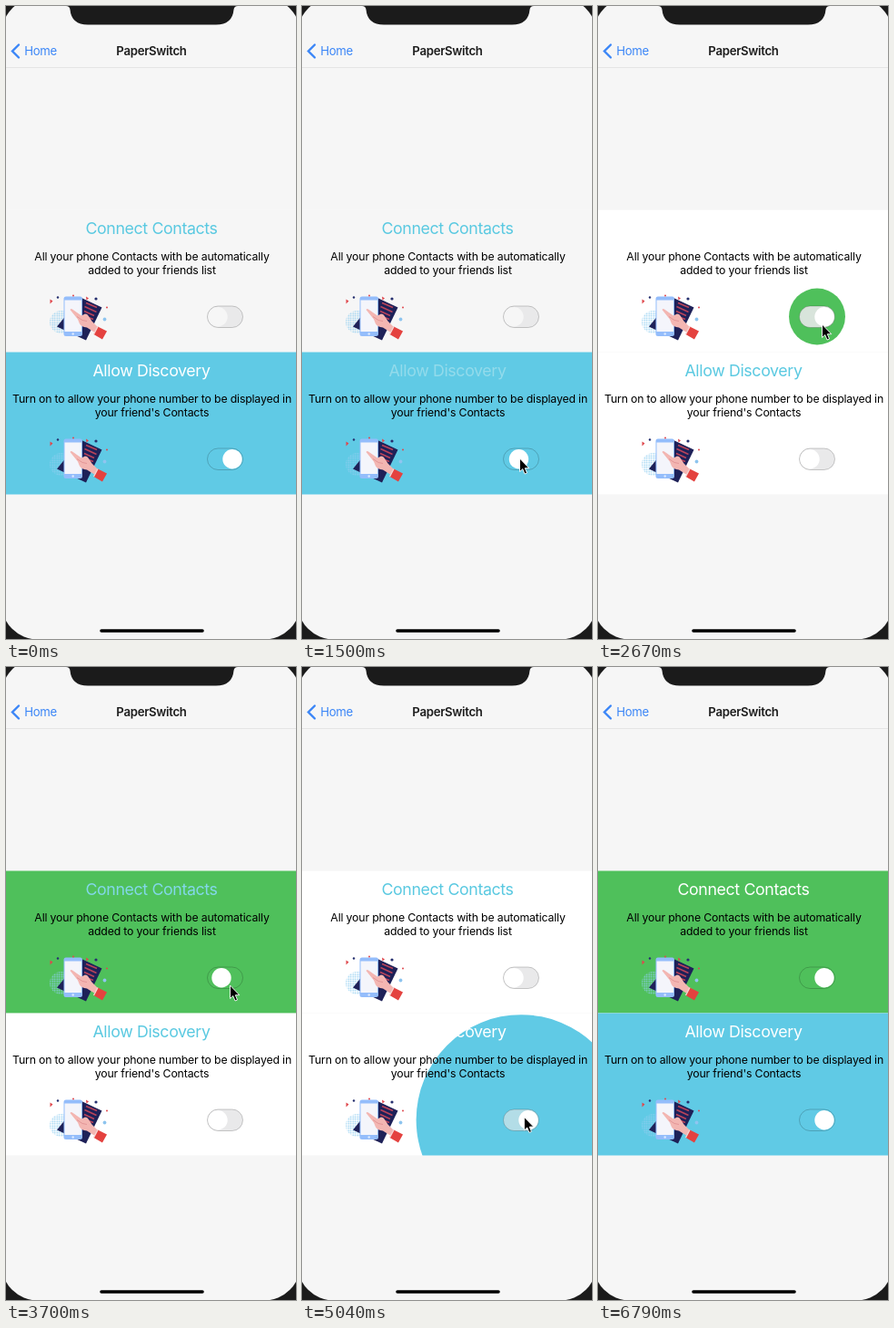
An HTML page for the animation above (8450 ms loop, 319 by 694 pixels).

```html
<!DOCTYPE html>
<html lang="en">
<head>
<meta charset="utf-8">
<title>PaperSwitch</title>
<style>
  html, body { margin: 0; width: 100%; height: 100%; overflow: hidden; background: #1b1b1b; }
  svg { display: block; }
  text { font-family: Inter, "Open Sans", sans-serif; text-anchor: middle; }
  .title { font-size: 17.8px; letter-spacing: -.38px; }
  .body { font-size: 12.3px; letter-spacing: -.17px; }
  .nav { font-size: 13.2px; letter-spacing: -.3px; }
</style>
</head>
<body>
<svg id="stage" width="319" height="694" viewBox="0 0 319 694">
  <defs>
    <pattern id="dots" width="2.500" height="2.500" patternUnits="userSpaceOnUse">
      <circle cx="1.250" cy="1.250" r=".8" fill="#8fcdf0"/>
    </pattern>
    <g id="art">
      <circle cx="60.500" cy="123" r="12.500" fill="url(#dots)"/>
      <path d="M82 96 105.500 107 88 143 56 128Z" fill="#1e2158"/>
      <path d="M88 102l12 5M86.500 106l13 6M86 111l11 5M91 118l5 2" stroke="#b9435a" stroke-width="1.600"/>
      <rect x="63.500" y="95" width="20.500" height="43.500" rx="2.500" fill="#94bdfb"/>
      <rect x="64.500" y="99" width="18.500" height="34.500" fill="#f4f5fb"/>
      <circle cx="73.700" cy="136" r="1.200" fill="#dceaff"/>
      <path d="M70.500 109.500q1-1.500 2.500-.5l10 7 4-2q2.500 0 3.500 2l4 6 7 7-4.500 5-8-5q-6-.5-8-4l-2-5Z" fill="#f3b6b2"/>
      <path d="M78 117l6 4 5 1" fill="none" stroke="#df8f91" stroke-width=".8"/>
      <path d="M101 128 111 133 106 142 96.500 136.500Z" fill="#e4423f"/>
      <path d="M101 128l-4.500 8.500" stroke="#f7d6d4" stroke-width="1.300"/>
      <path d="M48.500 98l3 2-3 3Z" fill="#e0484d"/>
      <path d="M88 95l3 2-2.500 2Z" fill="#e0484d"/>
      <g fill="#26306f">
        <circle cx="57" cy="96" r="1.200"/>
        <circle cx="99" cy="97.500" r="1.600"/>
      </g>
      <circle cx="74" cy="94" r="1" fill="#e0484d"/>
      <circle cx="108.500" cy="120" r="1.900" fill="#8fc5ef"/>
      <circle cx="111" cy="107" r="1" fill="#e0484d"/>
    </g>
  </defs>

  <rect width="319" height="694" fill="#1b1b1b"/>
  <rect x="-5" y="-9" width="329" height="703.500" rx="40" fill="#f6f6f6"/>
  <path d="M66 0q4 0 4.500 4Q72 20.500 90 20.500H231Q249 20.500 250.500 4 251 0 255 0Z" fill="#1b1b1b"/>
  <path d="M0 67.500H319" stroke="#e4e4e4"/>
  <path d="M14 42.500 7 49.500 14 56.500" fill="none" stroke="#3b86f7" stroke-width="2.400" stroke-linecap="round"/>
  <text class="nav" x="38" y="54.300" fill="#3b86f7">Home</text>
  <text class="nav" x="160" y="54.300" font-weight="600" fill="#1c1c1c">PaperSwitch</text>
  <rect x="103.200" y="683.200" width="114.600" height="3.600" rx="1.800" fill="#000"/>

  <g id="panels"></g>

  <g id="pointer">
    <circle id="touch" cx="2" cy="-.5" r="15.500" fill="#aaa" fill-opacity=".6" stroke="#8c8c8c"/>
    <path d="M.5 1V15.500L3.800 12.600 6 18 8.500 17 6.300 11.700H10.800Z" fill="#000" stroke="#fff" stroke-width=".9"/>
  </g>
</svg>
<script>
const LOOP = 8450, SPREAD = 350, SLIDE = 150, LEAD = 90, REACH = 290;
const $ = id => document.getElementById(id);
const ease = p => p * p * (3 - 2 * p);
const ramp = (t, start, len) => ease(Math.min(1, Math.max(0, (t - start) / len)));

// flips: times at which the colour starts to spread or shrink
const panels = [
  { y: 223.5, color: [79, 192, 91], on: 0, flips: [2600, 3690, 5910], title: 'Connect Contacts',
    lines: ['All your phone Contacts with be automatically', 'added to your friends list'] },
  { y: 379.5, color: [96, 202, 229], on: 1, flips: [1500, 4890], title: 'Allow Discovery',
    lines: ['Turn on to allow your phone number to be displayed in', "your friend's Contacts"] }
];
const presses = [1350, 2520, 3560, 4740, 5770];
const path = [
  [300, 284, 512], [1050, 239, 495], [1500, 239, 495], [2080, 249, 358], [2370, 248, 352],
  [2520, 246, 348], [3800, 246, 348], [4590, 246, 484], [4740, 244, 494], [5000, 244, 494],
  [5700, 236, 334], [5950, 236, 334], [6350, 228, 536], [6500, 240, 602], [6720, 289, 621]
];

$('panels').innerHTML = panels.map(p => `
  <svg y="${p.y}" width="319" height="156">
    <rect class="base" width="319" height="156"/>
    <circle class="paint" cx="241" cy="117" fill="rgb(${p.color})"/>
    <text class="title" x="160" y="26">${p.title}</text>
    ${p.lines.map((s, i) => `<text class="body" x="160.500" y="${55.5 + i * 15}">${s}</text>`).join('')}
    <use href="#art"/>
    <rect class="track" x="221.500" y="105.500" width="39" height="23.500" rx="11.750" fill="#e9e9ea" stroke="#000" stroke-opacity=".2"/>
    <circle class="knob" cy="117.250" r="10.700"/>
  </svg>`).join('');

panels.forEach((p, i) => {
  const root = $('panels').children[i];
  for (const c of ['base', 'paint', 'title', 'track', 'knob']) p[c] = root.querySelector('.' + c);
});

// 0 = off, 1 = on, blended through every flip
function level(p, t, lead, len) {
  let v = p.on, target = p.on;
  for (const f of p.flips) {
    target = 1 - target;
    v += (target - v) * ramp(t, f - lead, len);
  }
  return v;
}

function cursorAt(t) {
  const i = path.findIndex(k => k[0] > t);
  const [t0, x0, y0] = path[i - 1], [t1, x1, y1] = path[i];
  const k = ramp(t, t0, t1 - t0);
  return [x0 + (x1 - x0) * k, y0 + (y1 - y0) * k];
}

function draw(t) {
  panels.forEach((p, i) => {
    const fill = level(p, t, 0, SPREAD), slide = level(p, t, LEAD, SLIDE);
    const base = i === 0 && t < 2520 ? '#f6f6f6' : '#fff';
    const tint = [90, 201, 225].map(c => Math.round(c + (255 - c) * slide));
    p.base.setAttribute('fill', base);
    p.paint.setAttribute('r', REACH * fill);
    p.title.setAttribute('fill', `rgb(${tint})`);
    p.track.setAttribute('fill-opacity', 1 - fill);
    p.knob.setAttribute('cx', 233 + 16 * slide);
    p.knob.setAttribute('fill', base);
  });
  const shown = t >= path[0][0] && t < path[path.length - 1][0];
  $('pointer').style.display = shown ? '' : 'none';
  if (shown) $('pointer').setAttribute('transform', `translate(${cursorAt(t)})`);
  $('touch').style.display = presses.some(s => t >= s && t < s + 140) ? '' : 'none';
}

const start = performance.now();
function tick() {
  draw((performance.now() - start) % LOOP);
  requestAnimationFrame(tick);
}
tick();
</script>
</body>
</html>
```
